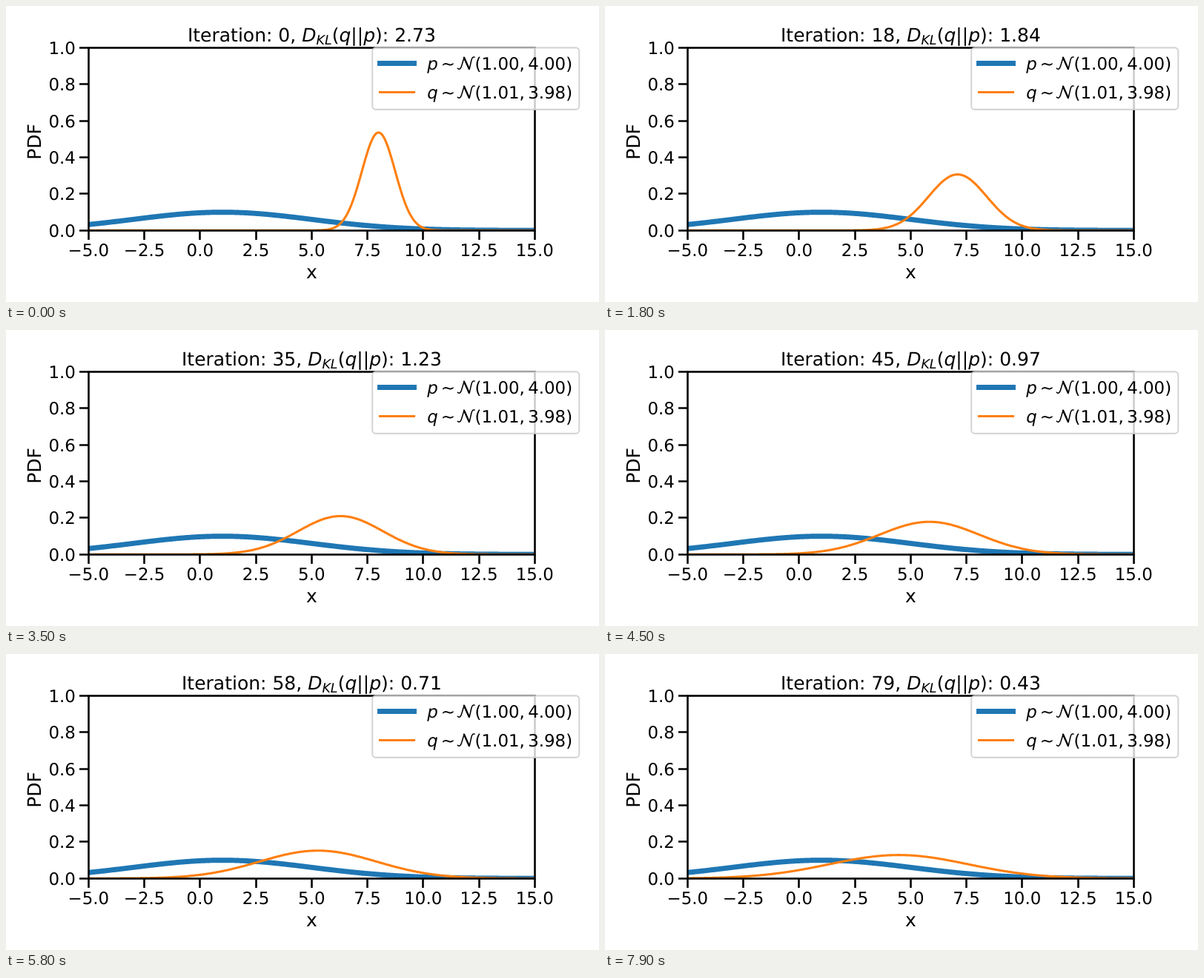
Write an HTML page that moves like this. It is 800 by 400 pixels and loops after 8000 ms.

```html
<!DOCTYPE html>
<html>
<head>
<meta charset="utf-8">
<style>
html, body { margin: 0; width: 100%; height: 100%; overflow: hidden; background: #fff; }
svg { display: block; font: 22.92px "DejaVu Sans", sans-serif; text-rendering: geometricPrecision; }
.large { font-size: 25px; }
.mid { text-anchor: middle; }
.it { font-style: italic; }
path, line { fill: none; }
.frame { fill: none; stroke: #000; stroke-width: 2.6; }
.p { stroke: #1f77b4; stroke-width: 6.94; stroke-linecap: square; }
.q { stroke: #ff7f0e; stroke-width: 3.1; stroke-linecap: square; stroke-linejoin: round; }
</style>
</head>
<body>
<svg width="800" height="400" viewBox="0 0 800 400">
  <clipPath id="box"><rect x="111" y="56" width="602" height="247"/></clipPath>
  <g clip-path="url(#box)">
    <path id="pCurve" class="p"/>
    <path id="qCurve" class="q"/>
  </g>
  <rect class="frame" x="111.5" y="56.5" width="602" height="247"/>
  <path id="ticks" class="frame"/>
  <g id="labels"></g>
  <text class="large mid" x="412.4" y="368">x</text>
  <text class="large mid" transform="translate(47 183.5) rotate(-90)">PDF</text>
  <text class="large mid" x="412.4" y="48">Iteration: <tspan id="iter">0</tspan>, <tspan class="it">D</tspan><tspan class="it" font-size="17.5" dy="4">KL</tspan><tspan dy="-4">(</tspan><tspan class="it">q</tspan>||<tspan class="it">p</tspan>): <tspan id="kl"></tspan></text>
  <rect x="494.2" y="56.4" width="279.1" height="83.5" rx="4.6" fill="#fff" fill-opacity=".8" stroke="#ccc" stroke-opacity=".8" stroke-width="2.08"/>
  <g id="legend"></g>
</svg>
<script>
const $ = id => document.getElementById(id);
const px = x => 111.3 + (x + 5) * 30.1;
const py = y => 303.3 - y * 246.9;
const snap = v => Math.floor(v) + 0.5;
const STEPS = 80, STEP_MS = 100;

function curve(mu, sigma) {
  let d = '';
  for (let i = 0; i <= 600; i++) {
    const x = -5 + i / 30;
    const y = Math.exp(-(((x - mu) / sigma) ** 2) / 2) / (sigma * Math.sqrt(2 * Math.PI));
    d += (i ? 'L' : 'M') + px(x).toFixed(2) + ' ' + py(y).toFixed(2);
  }
  return d;
}

// Fit q to p = N(1, 4) by Adam on the KL divergence, with sigma = softplus(rho).
function fit() {
  const w = [8, 0.1], m = [0, 0], v = [0, 0], states = [];
  for (let t = 1; t <= STEPS; t++) {
    const [mu, rho] = w, sigma = Math.log1p(Math.exp(rho));
    const kl = Math.log(4 / sigma) + (sigma ** 2 + (mu - 1) ** 2) / 32 - 0.5;
    states.push({ kl: kl.toFixed(2), d: curve(mu, sigma) });
    const grad = [(mu - 1) / 16, (sigma / 16 - 1 / sigma) / (1 + Math.exp(-rho))];
    grad.forEach((g, i) => {
      m[i] = 0.9 * m[i] + 0.1 * g;
      v[i] = 0.999 * v[i] + 0.001 * g * g;
      w[i] -= 0.05 * (m[i] / (1 - 0.9 ** t)) / (Math.sqrt(v[i] / (1 - 0.999 ** t)) + 1e-8);
    });
  }
  return states;
}

let ticks = '', labels = '';
for (let i = 0; i <= 8; i++) {
  const x = -5 + i * 2.5;
  ticks += `M${snap(px(x))} 303.5v12.5`;
  labels += `<text class="mid" x="${px(x)}" y="338">${x.toFixed(1).replace('-', '\u2212')}</text>`;
}
for (let i = 0; i <= 5; i++) {
  const y = py(i / 5);
  ticks += `M111.5 ${snap(y)}h-12.5`;
  labels += `<text text-anchor="end" x="93.9" y="${Math.round(y + 8.4)}">${(i / 5).toFixed(1)}</text>`;
}
$('ticks').setAttribute('d', ticks);
$('labels').innerHTML = labels;

const legendRow = (name, y, mean, dev) => `
  <line class="${name}" x1="504.5" x2="550.5" y1="${y}" y2="${y}"/>
  <g transform="translate(0 ${y + 8})">
    <text class="it" x="568.3">${name}</text>
    <text x="586.8">\u223c</text>
    <g stroke="#000" stroke-linecap="round" stroke-linejoin="round">
      <path stroke-width="1.5" d="M609.3 -1.2C611.5 1.2 613.6 -1 614.6 -4.5L618 -15.8M625.2 -.4L627.8 -12C628.6 -15.5 629.8 -17.2 632.2 -16.4"/>
      <path stroke-width="2.4" d="M618 -15.8L624.8 -.6"/>
    </g>
    <text x="632.6">(${mean},<tspan dx="4.3">${dev}</tspan>)</text>
  </g>`;
$('legend').innerHTML = legendRow('p', 77.5, '1.00', '4.00') + legendRow('q', 116.5, '1.01', '3.98');

$('pCurve').setAttribute('d', curve(1, 4));
const states = fit();
const start = performance.now();
let shown = -1;

function draw() {
  const i = Math.floor((performance.now() - start) / STEP_MS) % STEPS;
  if (i !== shown) {
    shown = i;
    $('iter').textContent = i;
    $('kl').textContent = states[i].kl;
    $('qCurve').setAttribute('d', states[i].d);
  }
  requestAnimationFrame(draw);
}
draw();
</script>
</body>
</html>
```
